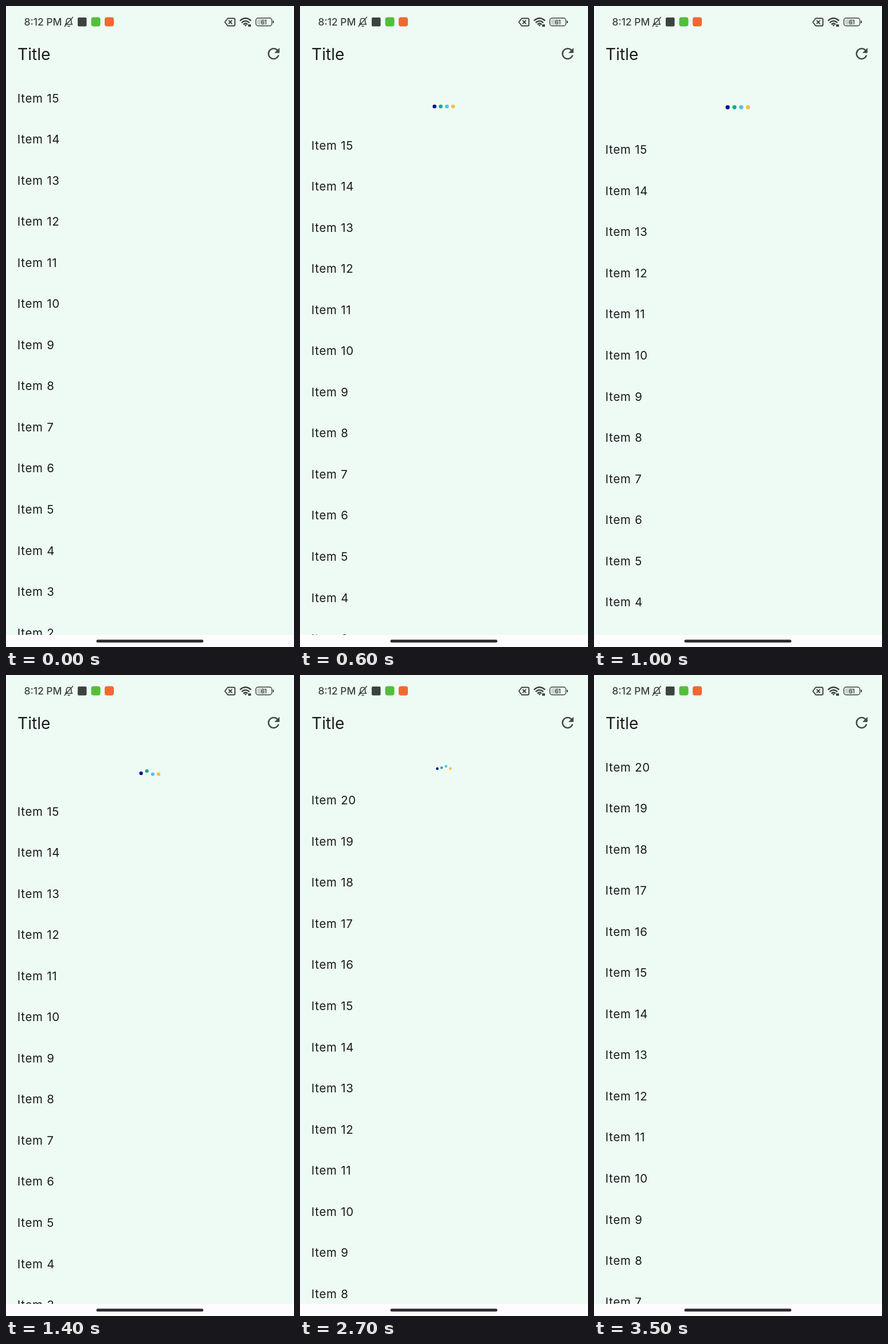
An HTML page that plays this animation: 502 by 1115 pixels, repeating every 3.6 s.

```html
<!DOCTYPE html>
<html lang="en">
<head>
<meta charset="utf-8">
<title>Pull to refresh</title>
<style>
  html, body { margin: 0; width: 100%; height: 100%; overflow: hidden; background: #eefaf4; }
  svg { display: block; width: 502px; height: 1115px; font-family: Inter, Roboto, sans-serif; }
  .line { fill: none; stroke: #3c433f; stroke-linecap: round; stroke-linejoin: round; }
  #list text { font-size: 20.4px; letter-spacing: .75px; fill: #191c1a; }
</style>
</head>
<body>
<svg viewBox="0 0 502 1115">
  <rect width="502" height="1115" fill="#eefaf4"/>
  <g id="list"></g>
  <g id="dots"></g>

  <!-- status bar -->
  <g fill="#3c433f">
    <text x="31.5" y="34" font-size="17.4" font-weight="500">8:12 PM</text>
    <path class="line" stroke-width="1.6" d="M103.5 32H115.5L113.7 29.5V25.5Q113.5 21.5 109.5 21.5T105.3 25.5V29.5ZM108 35.2H111M116.5 19.5L102 35.5"/>
    <rect x="125" y="20" width="15.5" height="15.5" rx="2"/>
    <rect x="148.5" y="19.5" width="16" height="16" rx="4" fill="#52bf3c"/>
    <rect x="172" y="19.500" width="16" height="16" rx="4" fill="#f2692f"/>
    <path class="line" stroke-width="1.9" d="M386.5 21.5H397Q399 21.5 399 23.5V32.5Q399 34.5 397 34.5H386.5L381.5 28ZM388.500 25.500L393.500 30.500M393.500 25.500L388.500 30.500"/>
    <path class="line" stroke-width="2.3" d="M408.5 25Q417.5 17.5 426.5 25M411.5 28.5Q417.5 23.5 423.5 28.5M414.5 31.5Q417.5 29 420.5 31.5"/>
    <path d="M415 32.5H420L417.5 35.5ZM422 33L423.5 31L425 33V36H422ZM425 32H427V36H425Z"/>
    <rect x="437.5" y="23" width="16" height="9.5" rx="2" fill="#c9d3ce"/>
    <rect x="435.5" y="21" width="28" height="13.5" rx="4" class="line" stroke-width="1.4"/>
    <rect x="465" y="25.5" width="2" height="4.5" rx="1"/>
    <text x="449.5" y="31.5" font-size="10" font-weight="500" text-anchor="middle">61</text>
  </g>

  <!-- app bar -->
  <text x="20" y="94" font-size="28.1" fill="#191c1a">Title</text>
  <path transform="translate(451.2 67.7) scale(1.278)" fill="#3f4945"
    d="M17.65 6.35A7.958 7.958 0 0 0 12 4a8 8 0 1 0 7.73 10h-2.08A6 6 0 1 1 12 6c1.66 0 3.14.69 4.22 1.78L13 11h7V4z"/>

  <!-- navigation bar -->
  <rect y="1094" width="502" height="21" fill="#fefcfe"/>
  <rect x="157.5" y="1102.3" width="186.5" height="5" rx="2.5" fill="#2b2d2c"/>
</svg>
<script>
const LOOP = 3600, STEP = 100, REST = 77, ROW = 71.55, DONE = 2600;
const list = document.getElementById('list');
const dotBox = document.getElementById('dots');

function add(parent, tag, attrs) {
  const el = document.createElementNS('http://www.w3.org/2000/svg', tag);
  for (const key in attrs) el.setAttribute(key, attrs[key]);
  return parent.appendChild(el);
}

const rows = Array.from({ length: 15 }, (_, i) =>
  add(list, 'text', { x: 19.7, y: 167.5 + i * ROW }));
const dots = ['#0d0a8f', '#13ae87', '#58bfe4', '#f6bf4b'].map((fill, i) =>
  add(dotBox, 'circle', { cx: (i - 1.5) * 10.15, r: 3.1, fill }));

const out = x => Math.sin(x * Math.PI / 2);
const inOut = x => (1 - Math.cos(x * Math.PI)) / 2;

// start, end, from, to, easing
const moves = [
  [0, 600, 0, 82, out],
  [600, 900, 82, 94, out],
  [900, 1200, 94, REST, inOut],
  [1200, DONE, REST, REST, inOut],
  [DONE, 2900, REST, 0, inOut]
];

function pullAt(t) {
  const move = moves.find(m => t < m[1]);
  if (!move) return 0;
  const [start, end, from, to, ease] = move;
  return from + (to - from) * ease((t - start) / (end - start));
}

// Each dot rises for 180 ms and falls for 280 ms
function hop(t, i) {
  const u = t - 1040 - 180 * i;
  if (u < 0) return 0;
  const v = u % 1140;
  return v < 180 ? inOut(v / 180) : v < 460 ? 1 - inOut((v - 180) / 280) : 0;
}

function draw(now) {
  const t = Math.floor(now % LOOP / STEP) * STEP;
  const pull = pullAt(t);
  const first = t < DONE ? 15 : 20;
  list.setAttribute('transform', `translate(0 ${pull})`);
  rows.forEach((row, i) => {
    const label = `Item ${first - i}`;
    if (row.textContent !== label) row.textContent = label;
  });
  const y = 134 + Math.min(pull, REST) / 2 + Math.sqrt(Math.max(0, pull - REST));
  dotBox.setAttribute('transform', `translate(250.7 ${y}) scale(${pull / REST})`);
  dots.forEach((dot, i) => dot.setAttribute('cy', -5.5 * hop(t, i)));
  requestAnimationFrame(draw);
}

draw(0);
</script>
</body>
</html>
```
